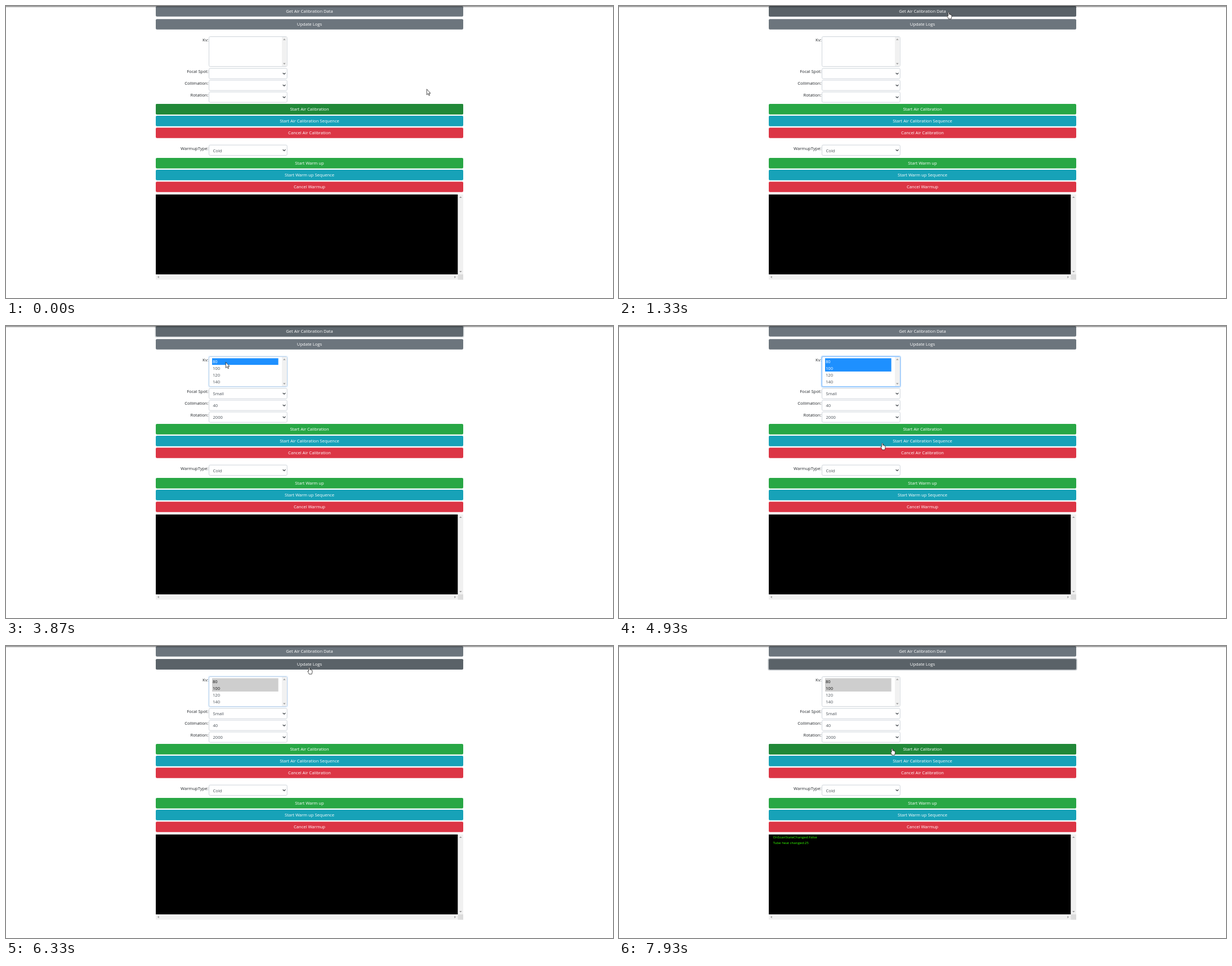
Recreate the animation shown at these times as an HTML page with a canvas. Size 1078 px wide and 519 px high, loop 8000 ms.

```html
<!DOCTYPE html>
<html lang="en">
<head>
<meta charset="utf-8">
<title>Air calibration</title>
<style>
html, body { margin: 0; width: 100%; height: 100%; overflow: hidden; background: #fff; }
canvas { display: block; }
</style>
</head>
<body>
<canvas id="stage" width="1078" height="519"></canvas>
<script>
const ctx = document.getElementById('stage').getContext('2d');
const LOOP = 8000, STEP = 1000 / 15;
const LEFT = 266, WIDTH = 546, HEIGHT = 18.7, PITCH = 21.05;
const LOADED = 1800, LOGGED = 6866;

const GREY = ['#6c757d', '#5a6268'], GREEN = ['#28a745', '#218838'];
const TEAL = ['#17a2b8', '#138496'], RED = ['#dc3545', '#c82333'];

const group = (name, mid) =>
  [[`Start ${name}`, GREEN], [`Start ${name} Sequence`, TEAL], [`Cancel ${name.replace('m up', 'mup')}`, RED]]
    .map(([label, colors], i) => ({ label, colors, mid: mid + i * PITCH }));
const buttons = [
  { label: 'Get Air Calibration Data', colors: GREY, mid: 9.5, focus: [1600, 3870] },
  { label: 'Update Logs', colors: GREY, mid: 32.5, focus: [6400, LOOP * 2] },
  ...group('Air Calibration', 183.4),
  ...group('Warm up', 279.4)
];

// Pointer moves: start, end, control point, end point
const moves = [
  [-67, 133, 749, 114, 738.5, 152],
  [333, 1267, 400, 60, 585.5, 11],
  [2467, 2933, 584, 6, 581, 54.5],
  [2933, 3333, 500, 60, 414, 63],
  [3333, 3533, 400, 64, 390, 64],
  [3867, 4000, 389.5, 70, 389.5, 75.5],
  [4400, 4933, 430, 58, 467.5, 208],
  [4933, 5267, 488, 210, 505, 201.5],
  [5267, 5733, 520, 195, 550.5, 90],
  [5733, 6133, 560, 50, 538.5, 38],
  [6800, 7667, 604, 50, 500, 145],
  [7667, 7933, 485, 190, 485, 182]
];

const clamp = v => Math.max(0, Math.min(1, v));
const fade = (t, [on, off]) => clamp((t - on + 70) / 200) * (1 - clamp((t - off + 70) / 200));

function pointer(t) {
  let x = 747, y = 180;
  for (const [from, to, cx, cy, ex, ey] of moves) {
    if (t <= from) break;
    const f = clamp((t - from) / (to - from)), g = 1 - f;
    x = g * g * x + 2 * f * g * cx + f * f * ex;
    y = g * g * y + 2 * f * g * cy + f * f * ey;
  }
  return [x, y];
}

const over = ([x, y], mid) => x > LEFT && x < LEFT + WIDTH && Math.abs(y - mid) < 9.7;
// Hover colour follows the pointer over the two previous steps
const hover = (t, mid) => (over(pointer(t - STEP), mid) + over(pointer(t - 2 * STEP), mid)) / 2;

function text(s, x, mid, color, align = 'left', size = 7.6) {
  ctx.font = `500 ${size}px "Open Sans", "Noto Sans", sans-serif`;
  ctx.textAlign = align;
  ctx.fillStyle = color;
  ctx.fillText(s, x, mid + size * 0.357);
}

function rect(x, y, w, h, color) {
  ctx.fillStyle = color;
  ctx.fillRect(x, y, w, h);
}

function round(x, y, w, h, r, fill, stroke) {
  ctx.beginPath();
  ctx.roundRect(x, y, w, h, r);
  if (fill) { ctx.fillStyle = fill; ctx.fill(); }
  if (stroke) { ctx.strokeStyle = stroke; ctx.lineWidth = 1; ctx.stroke(); }
}

function withAlpha(a, draw) {
  if (a <= 0) return;
  ctx.globalAlpha = a;
  draw();
  ctx.globalAlpha = 1;
}

function scrollArrow(x, y, turns) {
  ctx.save();
  ctx.translate(x, y);
  ctx.rotate(turns * Math.PI / 2);
  ctx.beginPath();
  ctx.moveTo(0, -1.4); ctx.lineTo(2.3, 1.1); ctx.lineTo(-2.3, 1.1);
  ctx.fillStyle = '#999';
  ctx.fill();
  ctx.restore();
}

function drawButton(t, { label, mid, colors: [base, dark], focus }) {
  const y = mid - HEIGHT / 2;
  const ring = focus ? fade(t, focus) : 0;
  withAlpha(ring, () => round(LEFT - 1.7, y - 1.7, WIDTH + 3.4, HEIGHT + 3.4, 3.5, '#c0c4c8'));
  round(LEFT, y, WIDTH, HEIGHT, 2, base);
  withAlpha(Math.max(ring, hover(t, mid)), () => round(LEFT, y, WIDTH, HEIGHT, 2, dark));
  text(label, 539, mid, '#fff', 'center');
}

function drawSelect(label, mid, value) {
  text(label, 359.5, mid - 3.5, '#212529', 'right');
  round(360.5, mid - 9.2, 138.7, 18.4, 2, '#fff', '#ced4da');
  text(value, 367.5, mid + 0.7, '#495057');
  ctx.beginPath();
  ctx.moveTo(491.6, mid - 1.2); ctx.lineTo(494, mid + 1.2); ctx.lineTo(496.4, mid - 1.2);
  ctx.strokeStyle = '#343a40';
  ctx.lineWidth = 1.2;
  ctx.stroke();
}

function drawList(t) {
  const focus = fade(t, [3870, 6270]), active = t < 6260;
  text('Kv:', 359.5, 60, '#212529', 'right');
  withAlpha(focus, () => round(358.5, 52.5, 142.5, 57, 3.5, '#bfdeff'));
  round(360.5, 54.5, 138.7, 53, 2, '#fff', '#ced4da');
  withAlpha(focus, () => round(360.5, 54.5, 138.7, 53, 2, null, '#80bdff'));
  rect(490, 55, 8.7, 52, '#f1f1f1');
  scrollArrow(494.3, 59.5, 0);
  scrollArrow(494.3, 102.5, 2);
  if (t < LOADED) return;
  const picked = (t >= 3867) + (t >= 4000);
  rect(366, 57.3, 117.6, picked * 11.8, active ? '#1e90ff' : '#cecece');
  for (let i = 0; i < 4; i++) {
    const color = i >= picked ? '#495057' : active ? '#fff' : '#101010';
    text(80 + i * 20, 367, 63.5 + i * 11.85, color);
  }
}

function drawLog(t) {
  rect(LEFT, 335, WIDTH, 151.5, '#f1f1f1');
  rect(LEFT, 335, 536.3, 142, '#000');
  rect(802.5, 477, 9.5, 9.5, '#dcdcdc');
  scrollArrow(807.3, 340, 0);
  scrollArrow(807.3, 472, 2);
  scrollArrow(270.5, 481.7, 3);
  scrollArrow(797.5, 481.7, 1);
  if (t < LOGGED) return;
  ['OnScanStateChanged:False', 'Tube heat changed:25'].forEach((line, i) =>
    text(line, 273.5, 340 + i * 9.6, '#3f0', 'left', 6.15));
}

const arrow = new Path2D('M.3 .3V10.4L2.6 8.2 4.2 11.7 5.6 11.1 4.1 7.7H7Z');
const hand = new Path2D('M-1 1Q0-.6 1 1V4.2Q2 0 2.5 4.4Q3.6 3.8 4 5Q5.4 4.4 5.4 6V8.4Q5 10 4.4 12H-.2Q-1 9.6-2.6 7.4Q-3 5.6-1 6.9Z');

function drawPointer(t) {
  const p = pointer(t);
  const shape = buttons.some(b => over(p, b.mid)) ? hand : arrow;
  ctx.save();
  ctx.translate(...p);
  ctx.lineWidth = 0.8;
  ctx.lineJoin = 'round';
  ctx.fillStyle = '#fff';
  ctx.strokeStyle = '#222';
  ctx.fill(shape);
  ctx.stroke(shape);
  ctx.restore();
}

function render(now) {
  const step = Math.floor((now % LOOP + 4) / STEP);
  const t = step < 2 ? 0 : step * STEP + 0.5;
  const shown = s => t < LOADED ? '' : s;
  rect(0, 0, 1078, 519, '#fff');
  buttons.forEach(b => drawButton(t, b));
  drawList(t);
  drawSelect('Focal Spot:', 120, shown('Small'));
  drawSelect('Collimation:', 141, shown('40'));
  drawSelect('Rotation:', 162, shown('2000'));
  drawSelect('WarmupType:', 256.3, 'Cold');
  drawLog(t);
  const shade = ctx.createLinearGradient(0, 0, 0, 3);
  shade.addColorStop(0, 'rgba(0,0,0,.5)');
  shade.addColorStop(1, 'rgba(0,0,0,0)');
  rect(0, 0, 1078, 3, shade);
  drawPointer(t);
}

const start = performance.now();
function tick() {
  render(performance.now() - start);
  requestAnimationFrame(tick);
}
tick();
</script>
</body>
</html>
```
